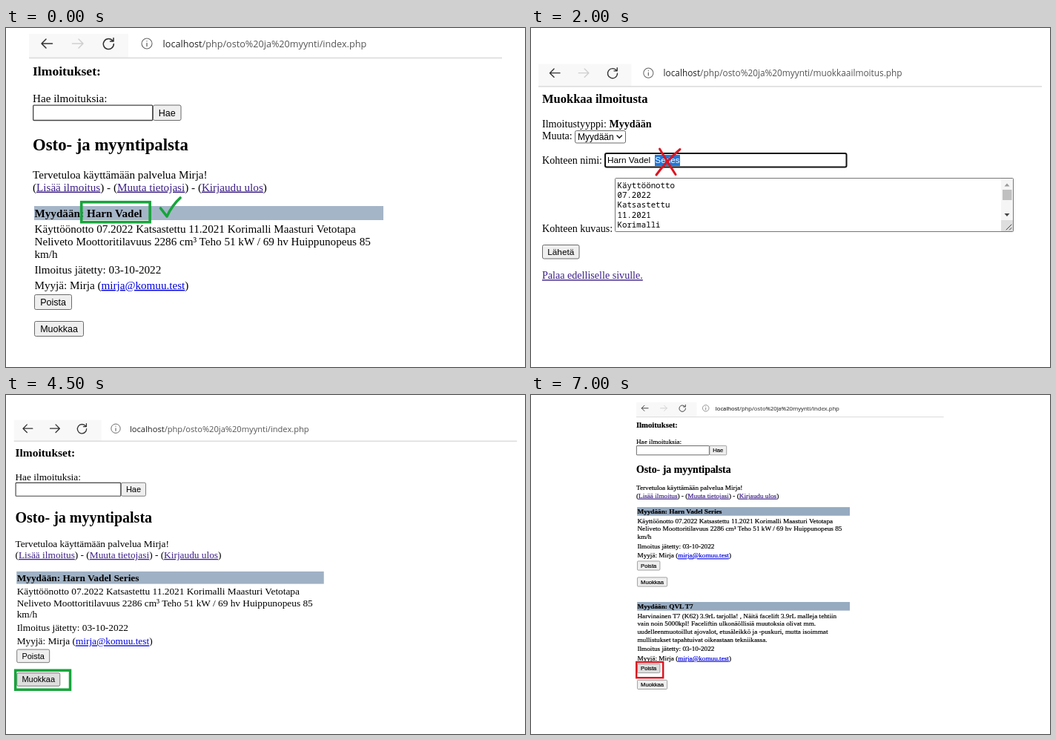
An HTML page that plays this animation: 700x457 px, repeating every 8 s.

```html
<!DOCTYPE html>
<html lang="fi">
<head>
<meta charset="utf-8">
<title>Osto- ja myyntipalsta</title>
<style>
  html, body { margin: 0; width: 100%; height: 100%; overflow: hidden; background: #fff; }
  svg { display: block; width: 700px; height: 457px; }
  text { font-family: "Liberation Serif", serif; white-space: pre; }
  .ui { font-family: "Liberation Sans", sans-serif; }
  .url { font-family: "Open Sans", sans-serif; }
  .mono { font-family: "Noto Sans Mono", monospace; }
  .bold { font-weight: bold; }
  .link { fill: #0000e0; text-decoration: underline; }
  .visited { fill: #3d2088; text-decoration: underline; }
  .line { fill: none; stroke-linecap: round; stroke-linejoin: round; }
  .crisp text { stroke: #000; stroke-width: .3px; }
  .crisp .url { stroke: #444; }
  .crisp .link { stroke: #0000e0; }
  .crisp .visited { stroke: #3d2088; }
</style>
</head>
<body>
<svg id="stage" viewBox="0 0 700 457"></svg>
<script>
const SELLER = 'Mirja', MAIL = 'mirja@komuu.test', CAR = 'Harn Vadel';
const GREEN = '#16a53a', RED = '#dc1420';
const BODY = 15.15, FORM = 14.1;

const text = (x, y, size, str, cls = '', more = '') =>
  `<text x="${x}" y="${y}" font-size="${size}" class="${cls}" ${more}>${str}</text>`;
const span = (cls, str) => `<tspan class="${cls}">${str}</tspan>`;
const rect = (x, y, w, h, fill, more = '') =>
  `<rect x="${x}" y="${y}" width="${w}" height="${h}" fill="${fill}" ${more}/>`;
const box = (x, y, w, h, color, width) =>
  rect(x, y, w, h, 'none', `stroke="${color}" stroke-width="${width}"`);
const path = (d, color, width) =>
  `<path class="line" d="${d}" stroke="${color}" stroke-width="${width}"/>`;
const button = (x, y, w, h, label, size = 12.5, fill = '#efefef') =>
  rect(x + .5, y + .5, w - 1, h - 1, fill, 'stroke="#6b6b6b" rx="2"') +
  text(x + w / 2, y + h / 2 + size * .34, size, label, 'ui', 'text-anchor="middle"');
const view = (x, y, scale, body, cls = '') =>
  `<g class="${cls}" transform="translate(${x} ${y}) scale(${scale})">${body}</g>`;

function toolbar(left, right, page, forward = '#cfcfcf') {
  return rect(left, 8, 134, 32, '#f8f8f8') +
    rect(left, 39.5, right - left, 1.8, '#dedede') +
    path('M62.5 21H48M54 15l-6 6 6 6', '#333', 1.5) +
    path('M89.5 21H104M98 15l6 6-6 6', forward, 1.5) +
    path('M144 17.5a7 7 0 1 0 1.3 4M145 13.5v4.5h-4.5', '#333', 1.5) +
    '<circle cx="190" cy="21" r="7" fill="none" stroke="#666" stroke-width="1.1"/>' +
    path('M190 20.5v4M190 17.6v.1', '#666', 1.3) +
    text(211.6, 26, 12.65, `localhost<tspan fill="#555">/php/osto%20ja%20myynti/${page}.php</tspan>`,
      'url', 'fill="#222"');
}

// One advert; the fields below the description follow its line count.
function advert(y, title, lines, color, hover) {
  const end = y + 35.6 + (lines.length - 1) * 17.4;
  const shade = label => hover === label ? '#dedede' : '#efefef';
  return rect(38, y, 471, 19, color) +
    text(38.5, y + 14.7, BODY, 'Myydään: ' + title, 'bold') +
    lines.map((line, i) => text(38.5, y + 35.6 + i * 17.4, BODY, line)).join('') +
    text(38.5, end + 21, BODY, 'Ilmoitus jätetty: 03-10-2022') +
    text(38.5, end + 41.5, BODY, `Myyjä: ${SELLER} (${span('link', MAIL)})`) +
    button(38, end + 48.6, 51, 21, 'Poista', 12.5, shade('Poista')) +
    button(38, end + 84.6, 67, 21, 'Muokkaa', 12.5, shade('Muokkaa'));
}

const carLines = [
  'Käyttöönotto 07.2022 Katsastettu 11.2021 Korimalli Maasturi Vetotapa',
  'Neliveto Moottoritilavuus 2286 cm³ Teho 51 kW / 69 hv Huippunopeus 85',
  'km/h'
];
const secondLines = [
  'Harvinainen T7 (K62) 3.9rL tarjolla! , Näitä facelift 3.9rL malleja tehtiin',
  'vain noin 5000kpl! Faceliftin ulkonäöllisiä muutoksia olivat mm.',
  'uudelleenmuotoillut ajovalot, etusäleikkö ja -puskuri, mutta isoimmat',
  'mullistukset tapahtuivat oikeastaan tekniikassa.'
];

const links = ['Lisää ilmoitus', 'Muuta tietojasi', 'Kirjaudu ulos']
  .map(label => `(${span('visited', label)})`).join(' - ');

const listing = (left, right, forward) =>
  toolbar(left, right, 'index', forward) +
  text(36, 64, 17.6, 'Ilmoitukset:', 'bold') +
  text(36, 100, BODY, 'Hae ilmoituksia:') +
  rect(36.7, 104.2, 161, 20.3, '#fff', 'stroke="#444" stroke-width="1.3" rx="1"') +
  button(198, 103.5, 38.5, 21.5, 'Hae') +
  text(36, 164.8, 22.75, 'Osto- ja myyntipalsta', 'bold') +
  text(36, 202.6, BODY, `Tervetuloa käyttämään palvelua ${SELLER}!`) +
  text(36, 219.6, BODY, links);

function editForm() {
  const words = ['Käyttöönotto', '07.2022', 'Katsastettu', '11.2021', 'Korimalli'];
  return text(15, 101, 16.5, 'Muokkaa ilmoitusta', 'bold') +
    text(15, 133.7, FORM, 'Ilmoitustyyppi: ' + span('bold', 'Myydään')) +
    text(15, 150.2, FORM, 'Muuta:') +
    rect(59.5, 138.5, 68, 16.5, '#fff', 'stroke="#6b6b6b" rx="2"') +
    text(63, 151, 12, 'Myydään', 'ui') +
    path('M116 145l3.2 3.2 3.2-3.2', '#222', 1.6) +
    text(15, 182.7, FORM, 'Kohteen nimi:') +
    rect(100, 169, 325.5, 18.5, '#fff', 'stroke="#111" stroke-width="2" rx="2"') +
    rect(167, 171, 34, 15, '#1f78dc') +
    text(103, 182, 11.8, CAR, 'ui') +
    text(167.3, 182, 11.8, 'Series', 'ui', 'fill="#fff"') +
    path('M173.5 163Q183 179 195 197.5M201 163.5Q182 180 169 198', RED, 3) +
    text(15, 274.7, FORM, 'Kohteen kuvaus:') +
    rect(113.5, 202.5, 537, 72, '#fff', 'stroke="#767676" rx="1"') +
    words.map((word, i) => text(116.5, 215.5 + i * 13.45, 10.75, word, 'mono')).join('') +
    rect(634, 203, 16, 56, '#f5f5f5') +
    rect(636, 218, 12.5, 14, '#c0c0c0') +
    '<path d="M638.5 213.5h7l-3.5-4z" fill="#999"/>' +
    '<path d="M638.5 250h7l-3.5 4z" fill="#444"/>' +
    rect(634, 259, 16, 15, '#dedede') +
    path('M641 272l7-7M645.5 272l2.5-2.5', '#444', 1) +
    button(15, 292, 50.5, 19.5, 'Lähetä', 11.8) +
    text(15, 338.2, FORM, 'Palaa edelliselle sivulle.', 'visited');
}

const scenes = [
  { until: 500, body:
    listing(31, 669) + advert(240, '', carLines, '#a5b5c8') +
    text(109, 254.7, BODY, CAR, 'bold') +
    box(101.7, 234.7, 92.4, 27, GREEN, 3.6) +
    path('M208.5 243l8.5 11q7-15 18-25', GREEN, 3.6) },
  { until: 3000, body:
    view(-19.5, 41, .936, toolbar(31.5, 757, 'muokkaailmoitus')) + editForm() },
  { until: 5500, body:
    view(-19.2, 26.7, .88, listing(34, 805, '#333') +
      advert(240, CAR + ' Series', carLines, '#9fb1c4', 'Muokkaa')) +
    box(12.7, 371.2, 73.8, 26, GREEN, 3.5) },
  { until: 8000, body:
    view(120, 5, .609, listing(36, 717) +
      advert(240, CAR + ' Series', carLines, '#96aac0') +
      advert(450, 'QVL T7', secondLines, '#96aac0', 'Poista'), 'crisp') +
    box(142.2, 360, 36, 21.2, RED, 2.4) }
];

const stage = document.getElementById('stage');
stage.innerHTML = scenes.map(scene => `<g>${scene.body}</g>`).join('');
const groups = [...stage.children];
const start = performance.now();

function draw() {
  const time = (performance.now() - start) % 8000;
  const current = scenes.findIndex(scene => time < scene.until);
  groups.forEach((group, i) => group.style.display = i === current ? '' : 'none');
  requestAnimationFrame(draw);
}
draw();
</script>
</body>
</html>
```
